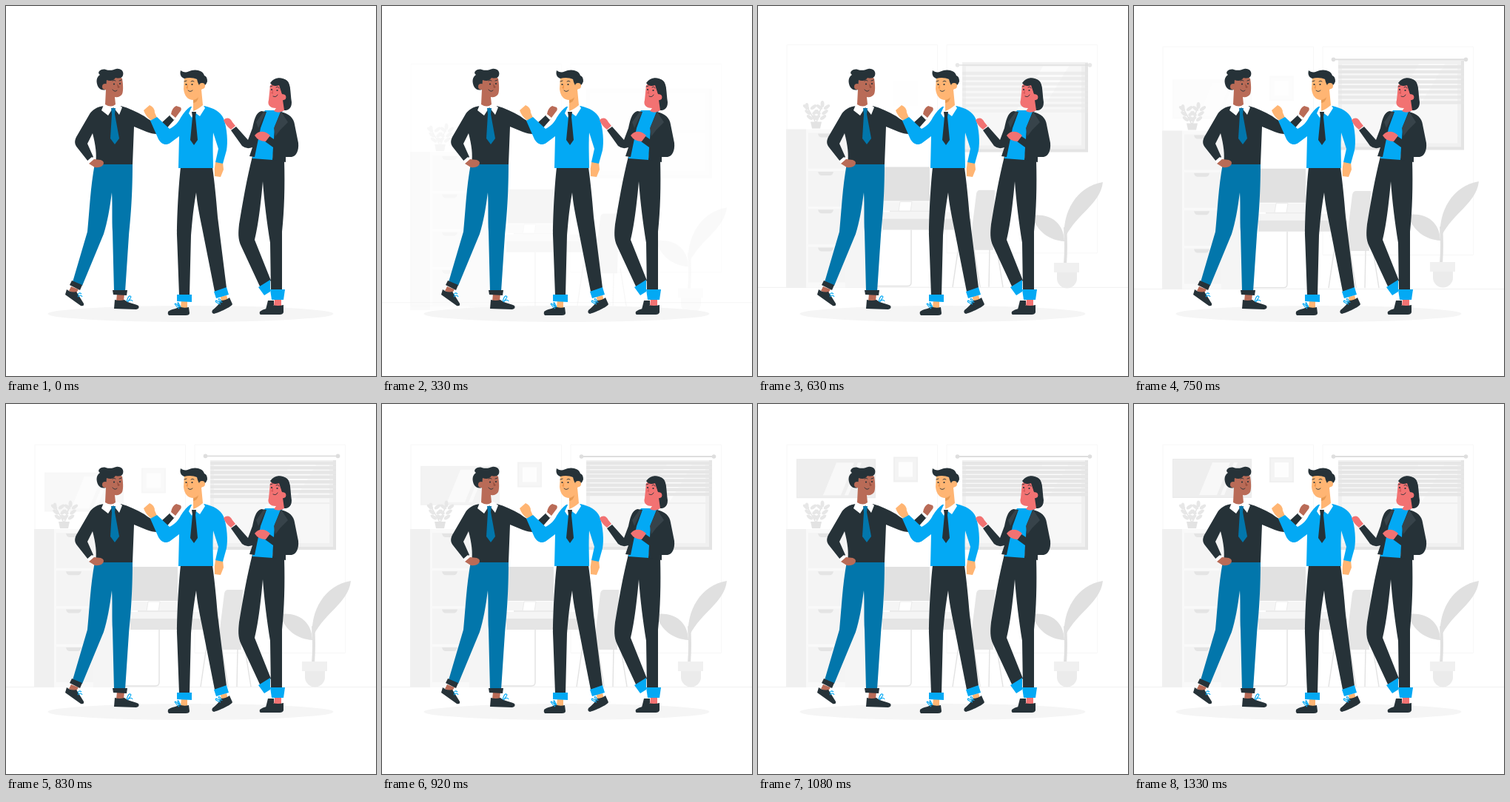
An HTML page that plays this animation: 500x500 px, repeating every 1.43 s.

```html
<!DOCTYPE html>
<html lang="en">
<head>
<meta charset="utf-8">
<style>
  html, body { margin: 0; height: 100%; overflow: hidden; background: #fff; }
  svg { display: block; width: 100%; height: 100%; }
  .dark { fill: #263238; }
  .blue { fill: #03a9f4; }
  .navy { fill: #0276ab; }
  .white { fill: #fff; }
  .brown { fill: #b96b57; }
  .tan { fill: #ffb573; }
  .pink { fill: #f27272; }
  .line { fill: none; stroke: #263238; stroke-width: .9; stroke-linecap: round; }
  .lace { fill: none; stroke: #03a9f4; stroke-width: 1.1; }
  .pale { fill: none; stroke: #e2e2e2; stroke-width: 1.4; }
</style>
</head>
<body>
<svg viewBox="0 0 500 500">
  <!-- data-rise: start ms, travel px, overshoot handle -->
  <g data-rise="90 40 1.38"><path d="M0 382.5H500" stroke="#f0f0f0"/></g>
  <g data-rise="125 40 1.38" fill="none" stroke="#f7f7f7">
    <path d="M39 55H242.500V382H39ZM255 55H458.500V336.500H255Z"/>
  </g>
  <g data-rise="230 40 1.38">
    <path d="M276 76H446V197H276Z" fill="#e4e4e4"/>
    <path d="M276 76H442V193H276Z" fill="#f0f0f0"/>
    <path d="M281 81H437V188H281Z" fill="#f7f7f7"/>
    <path d="M320 188L385 81H420L355 188Z" fill="#fcfcfc"/>
    <path d="M276 134H442" stroke="#efefef" stroke-width="2"/>
  </g>
  <g id="slats"></g>
  <g data-rise="320 30 1.2">
    <path d="M269 71H449" stroke="#dedede" stroke-width="1.800"/>
    <circle cx="269.500" cy="71" r="2.800" fill="#dedede"/><circle cx="448.500" cy="71" r="2.800" fill="#dedede"/>
  </g>
  <g data-rise="620 30 1.2">
    <path d="M52 74H159V127H52Z" fill="#ebebeb"/>
    <path d="M53 75H158V125.500H53Z" fill="#eee"/>
    <path d="M88 123L106 79H130L112 123ZM117 123L135 79H140L122 123Z" fill="#f8f8f8"/>
  </g>
  <g data-rise="580 30 1.2">
    <path d="M183 72H216V106H183Z" fill="#f0f0f0"/>
    <path d="M185 74H214V104H185Z" fill="#f4f4f4"/>
    <path d="M190 79H209V99H190Z" fill="#fdfdfd"/>
  </g>
  <g data-rise="160 40 1.38">
    <path d="M38 169H65V383H38Z" fill="#f0f0f0"/>
    <path d="M65 169H118V383H65Z" fill="#f9f9f9"/>
    <path d="M118 169H146V383H118Z" fill="#f5f5f5"/>
    <g id="drawers"></g>
    <path d="M71 159H86L84 168H73Z" fill="#e3e3e3"/>
    <path d="M78 160Q74 152 67 140M79 160Q82 148 87 135" class="pale"/>
    <g id="sprigs" fill="#e7e7e7"></g>
  </g>
  <g data-rise="158 40 1.38">
    <path d="M170 220H232V266H170Z" fill="#e1e1e1"/>
    <path d="M170 267H250V279H170Z" fill="#f5f5f5"/>
    <path d="M190 280L192 267H208L206 280Z" fill="#fff" stroke="#ebebeb"/>
    <path d="M178 280H235" stroke="#ebebeb" stroke-width="2"/>
    <path d="M168 281H288V290H168Z" fill="#f5f5f5"/>
    <path d="M168 290H288V305H168Z" fill="#e5e5e5"/>
    <path d="M207 305V376Q207 381 202 381H160" class="pale"/>
  </g>
  <g data-rise="170 40 1.38">
    <path d="M300 251H320L318 332H294Q286 330 287 320L295 256Q296 251 300 251Z" fill="#e5e5e5"/>
    <path d="M275 300L263 382M292 331L300 382M313 331L312 382M322 325L331 382" class="pale"/>
  </g>
  <g data-rise="203 40 1.38">
    <path d="M414 315C411 280 430 245 466 239C463 268 431 282 416 312Z" fill="#e0e0e0"/>
    <path d="M370 284C394 281 413 293 414 319C394 318 377 306 370 284Z" fill="#e0e0e0"/>
    <path d="M415 300Q417 325 415 350" fill="none" stroke="#e0e0e0" stroke-width="4"/>
    <path d="M404 360H431V369A13.500 13.500 0 0 1 404 369Z" fill="#ebebeb"/>
    <path d="M400 348H434V361H400Z" fill="#f0f0f0"/>
  </g>

  <ellipse cx="249.500" cy="416" rx="193" ry="11" fill="#f5f5f5"/>

  <g id="left-man">
    <path class="brown" d="M88 379L98 383L94 389L85 385ZM150 389H160L159 399H149Z"/>
    <path class="dark" d="M82 383Q88 388 95 386L105 402Q106 406 101 405L80 390ZM147 397Q154 399 160 397C166 402 174 402 179 405Q181 409 176 410L146 409Z"/>
    <path class="navy" d="M120 213H171C171 260 168 290 166 310L161 386H146L144 305C143 290 144 270 143 252C140 275 137 292 132 308L103 378L90 373L110 305C113 275 114 245 120 213Z"/>
    <path class="dark" d="M89 371L103 377L100 384L86 377ZM144 384H164L163 391L145 390Z"/>
    <path class="dark" d="M133 135C123 136 117 140 113 146L95 177C92 183 93 187 96 191L111 210L118 204L110 186L117 172C121 188 123 200 121 214H171L173 163L190 170C200 174 209 174 213 170L228 153L222 147L209 159C200 158 193 154 187 149C177 143 166 138 155 135Z"/>
    <path class="white" d="M109 210L116 204L119 207L113 213ZM221 148L224 145L230 151L227 154Z"/>
    <path class="brown" d="M112 213L119 207L128 208Q134 210 131 215Q127 219 120 218Z"/>
    <path class="brown" d="M223 146Q224 138 230 135L236 137Q238 140 235 143L229 151Z"/>
    <path class="white" d="M133 131L129 141L138 148L145 137L153 147L157 137L151 132Z"/>
    <path class="navy" d="M142 138H148L147 146L153 179L147 187L141 179L143 146Z"/>
    <path class="brown" d="M136 98C142 93 152 94 157 98C158 104 159 114 157 119Q154 124 147 123L148 133Q142 138 134 133L135 113C129 114 129 105 135 105Z"/>
    <path class="dark" d="M125 110C121 103 122 96 127 93C122 90 128 84 135 86C142 88 145 86 149 85C155 84 160 88 158 94Q156 99 148 97Q144 103 136 100L135 113Q129 115 125 110Z"/>
    <circle cx="134" cy="109" r="4" class="brown"/>
    <circle cx="146" cy="105.500" r="1.100" class="dark"/><circle cx="154" cy="105" r="1.100" class="dark"/>
    <path class="line" d="M144 101Q146 99 148 101M153 101L156 100M144 113Q147 117 150 114"/>
    <path d="M150 105L154 110L151 111" fill="#98503f"/>
    <path class="lace" d="M97 391Q98 386 102 389M97 393Q101 389 103 393M163 399Q166 389 169 393Q167 397 164 400Q169 395 171 399"/>
  </g>

  <g id="middle-man">
    <path class="tan" d="M237 397H245V408H236ZM290 393L298 391L300 398L291 401ZM283 211H293L294 221L290 231L282 230Q281 220 283 211ZM186 141L194 134Q201 137 201 144L204 151L197 155Q189 150 186 141Z"/>
    <path class="dark" d="M219 413C224 409 230 410 234 406Q240 409 247 407L248 415Q248 418 243 418H220Q218 416 219 413ZM279 411C285 406 289 402 290 398Q297 398 302 394L306 403C304 407 288 414 281 416Q277 415 279 411Z"/>
    <path class="dark" d="M236 218H279C282 240 284 260 286 285L298 381L282 386L265 300C261 280 258 265 257 252C252 280 251 300 250 310L248 391H234C233 365 232 335 231 310C231 285 233 245 236 218Z"/>
    <path class="blue" d="M231 390H251V400L231 399ZM281 386L298 380L301 390L284 395Z"/>
    <path class="blue" d="M249 136L268 135C281 138 290 143 294 152C299 165 300 185 298 195L293 213L283 211L287 193L280 171C279 190 280 205 280 219H233L234 176L222 185C216 189 210 187 206 180L195 155L204 150L221 166C229 162 233 157 236 151Q242 141 249 136Z"/>
    <path class="white" d="M252 134L247 145L251 151L254 143L262 149L269 138L266 133Z"/>
    <path class="dark" d="M251 143H257L256 150L259 181L254 188L249 181L252 150Z"/>
    <path class="tan" d="M241 96Q253 93 262 103C269 102 270 111 264 113L266 134Q259 140 253 142L253 127C246 127 241 122 240 112Z"/>
    <path class="dark" d="M236 87C234 94 238 97 241 98C247 96 254 97 258 99Q260 108 264 110Q270 108 272 102Q272 95 268 94C267 88 258 85 251 87C246 88 243 92 236 87Z"/>
    <circle cx="265" cy="108" r="4" class="tan"/>
    <circle cx="243.500" cy="106" r="1.100" class="dark"/><circle cx="251.500" cy="106" r="1.100" class="dark"/>
    <path class="line" d="M241 102L244 101M250 102Q252 100 254 102M246 114Q249 117 252 114"/>
    <path d="M246 105L243 111L246 112" fill="#f19a50"/>
    <path d="M253 127Q258 126 260 123Q259 130 253 131Z" fill="#e79a53"/>
    <path class="lace" d="M234 409Q226 402 229 402L235 407Q230 400 233 401L236 407M290 403Q281 400 284 398L290 401Q285 394 289 396L292 401"/>
  </g>

  <g id="woman">
    <path class="pink" d="M363 396H372V406H362ZM294 154Q301 148 306 157L310 162L304 167Q297 162 294 154Z"/>
    <path class="dark" d="M354 398H362V404L351 410ZM343 413C348 409 356 409 360 404Q368 406 375 404L375 414Q374 417 370 417H344Q342 416 343 413Z"/>
    <path class="dark" d="M333 203L376 208C377 245 376 275 373 305V385H358L357 320C353 295 349 265 347 237C344 272 340 300 336 316L358 371L344 381L318 325C313 315 314 305 315 295C320 265 325 235 333 203Z"/>
    <path class="blue" d="M341 380L357 370V386L349 391ZM357 383H377L375 397H359Z"/>
    <path class="blue" d="M350 141H374L364 172L360 208L333 206L340 158Z"/>
    <path class="dark" d="M345 142C337 144 335 156 333 165L327 181L311 163L304 168L319 189Q325 194 333 191L329 203L336 204L344 165L352 143ZM371 143C383 145 389 152 390 160L395 185C396 196 392 203 386 204H378V211L360 208L361 191L350 183L356 176L362 180L363 163Z"/>
    <path d="M372 143L381 157L371 167L364 176L362 165ZM348 143L338 157L341 165L351 144Z" fill="#37434a"/>
    <path class="pink" d="M336 175C341 168 350 168 357 175L351 183Q341 183 336 175Z"/>
    <path class="dark" d="M360 103C365 96 374 96 380 101C385 106 384 116 386 130Q386 142 374 141L366 132Z"/>
    <path class="pink" d="M357 107Q364 102 370 107L373 118C377 116 380 120 379 124Q377 128 374 127L376 141Q369 146 362 142L365 138C356 138 353 133 355 127Z"/>
    <path class="dark" d="M357 104Q365 93 378 100Q384 105 384 116Q385 128 378 126Q380 119 373 119L369 107Q361 110 357 104Z"/>
    <circle cx="359" cy="113" r="1.100" class="dark"/><circle cx="366.500" cy="114" r="1.100" class="dark"/>
    <path class="line" d="M357 109L360 108M365 110Q368 108 369 111M361 122Q365 124 367 120"/>
    <path d="M361 113L358 118L361 119" fill="#d95c5d"/>
  </g>
</svg>
<script>
  const LOOP = 1430, RISE = 600;
  const byId = id => document.getElementById(id);
  const repeat = (n, make) => Array.from({ length: n }, (_, i) => make(i)).join('');

  byId('slats').innerHTML = repeat(8, i =>
    `<g data-rise="${340 + i * 13} 30 1.2"><path d="M276 ${78 + i * 6}h170v4.500h-170z" fill="#e6e6e6"/></g>`);

  byId('drawers').innerHTML = repeat(4, i => {
    const y = 174 + i * 51.3;
    return `<path d="M68 ${y}h50v48h-50z" fill="#f4f4f4"/>
      <path d="M81 ${y + 1}h21q-1 5-5 5h-11q-4 0-5-5z" fill="#e4e4e4"/>`;
  });

  byId('sprigs').innerHTML = repeat(12, i => {
    const stem = i < 6 ? -1 : 1, row = i % 6 >> 1, side = i % 2 ? 1 : -1;
    const x = 79 + stem * (4 + row * 2.5) + side * 5, y = 153 - row * 7;
    return `<ellipse cx="${x}" cy="${y}" rx="4.800" ry="2.300" transform="rotate(${-side * 35} ${x} ${y})"/>`;
  }) + '<ellipse cx="66" cy="138" rx="2.500" ry="4.500"/><ellipse cx="87" cy="135" rx="2.500" ry="4.500"/>';

  // Cubic Bezier easing with handles (.36, 0) and (.5, lift)
  function ease(x, lift) {
    if (x <= 0) return 0;
    if (x >= 1) return 1;
    const curve = (t, a, b) => 3 * (1 - t) ** 2 * t * a + 3 * (1 - t) * t * t * b + t ** 3;
    let lo = 0, hi = 1;
    for (let i = 0; i < 20; i++) {
      const mid = (lo + hi) / 2;
      if (curve(mid, .36, .5) < x) lo = mid; else hi = mid;
    }
    return curve(lo, 0, lift);
  }

  const parts = [...document.querySelectorAll('[data-rise]')].map(el => {
    const [start, travel, lift] = el.dataset.rise.split(' ').map(Number);
    return { el, start, travel, lift };
  });

  function draw() {
    const time = performance.now() % LOOP;
    for (const { el, start, travel, lift } of parts) {
      const p = ease((time - start) / RISE, lift);
      el.setAttribute('transform', `translate(0 ${travel * (1 - p)})`);
      el.setAttribute('opacity', Math.min(1, p));
    }
    requestAnimationFrame(draw);
  }
  draw();
</script>
</body>
</html>
```
